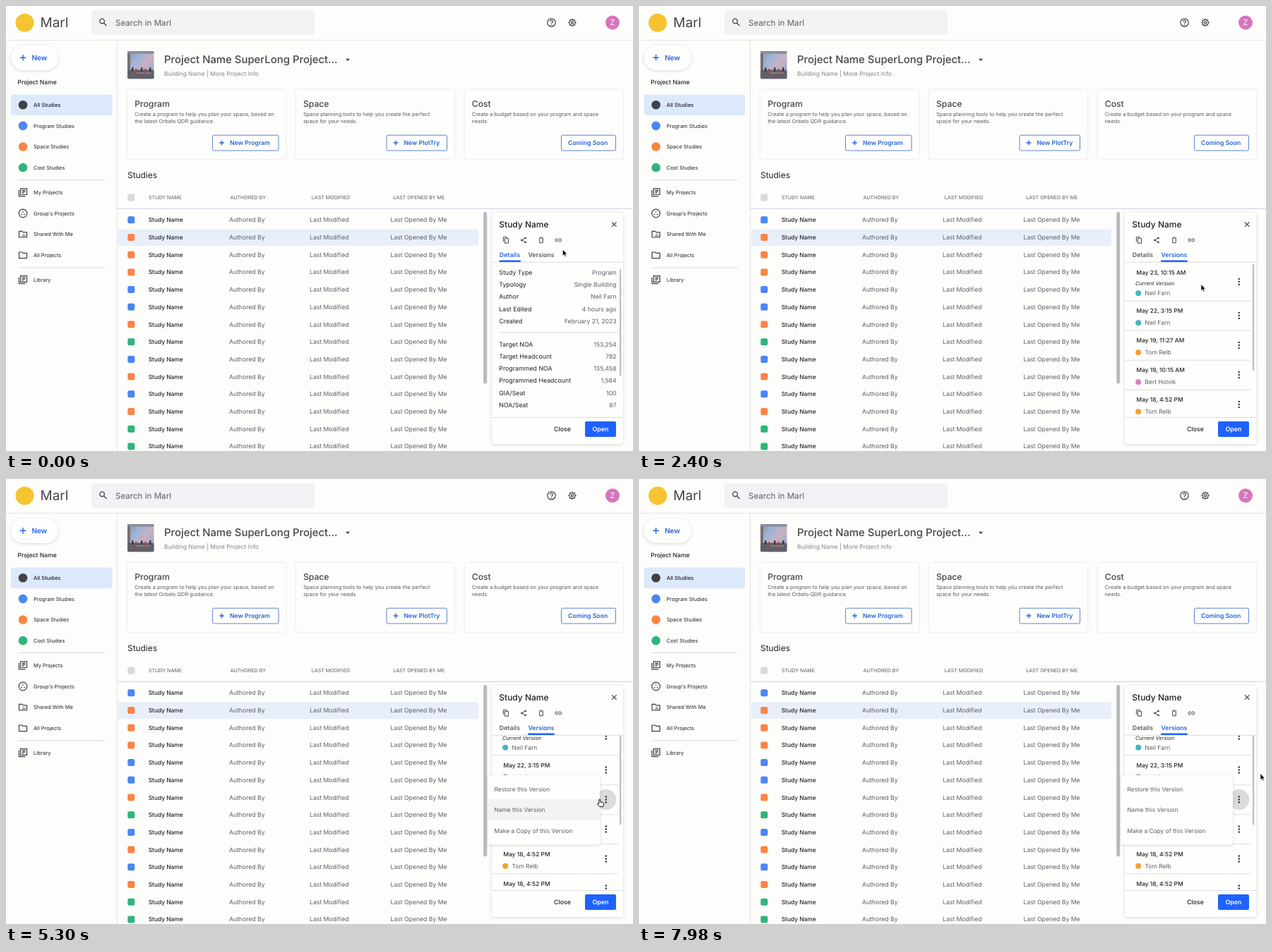
These frames come from a looping animation (888 px wide and 631 px high, 8000 ms). An HTML page:

```html
<!DOCTYPE html>
<html lang="en">
<head>
<meta charset="utf-8">
<title>Study versions</title>
<style>
  html, body { margin: 0; width: 100%; height: 100%; overflow: hidden; background: #fdfdfb; }
  svg { display: block; width: 100vw; height: 100vh; }
  text { font-family: Inter, Roboto, sans-serif; text-rendering: geometricPrecision; white-space: pre; }
  .line { fill: none; stroke: #3c4043; stroke-width: 1.2; }
  .card { fill: #fdfdfb; filter: drop-shadow(0 .6px 1px rgba(60, 64, 90, .22)); }
  .raised { fill: #fefefc; filter: drop-shadow(0 1px 2px rgba(60, 64, 67, .2)); }
</style>
</head>
<body>
<svg id="stage" viewBox="0 0 888 631" preserveAspectRatio="none"></svg>
<script>
const LOOP = 8000;
const INK = '#202124', DARK = '#444649', GREY = '#5a5d62', ACTION = '#2564dc', BRIGHT = '#1f62ff';
const BLUE = '#4b86f4', ORANGE = '#f98446', GREEN = '#31b47c';

// ---- drawing helpers: each returns SVG markup ----
const text = (x, y, str, size, fill = GREY, weight = 400, extra = '') =>
  `<text x="${x}" y="${y}" font-size="${size}" fill="${fill}" font-weight="${weight}" ${extra}>${str}</text>`;
const rect = (x, y, w, h, fill, r = 0, extra = '') =>
  `<rect x="${x}" y="${y}" width="${w}" height="${h}" rx="${r}" fill="${fill}" ${extra}/>`;
const box = (x, y, w, h, r, cls) =>
  `<rect x="${x}" y="${y}" width="${w}" height="${h}" rx="${r}" class="${cls}"/>`;
const dot = (x, y, r, fill, extra = '') => `<circle cx="${x}" cy="${y}" r="${r}" fill="${fill}" ${extra}/>`;
const hline = (x1, x2, y, color = '#dadce0') => rect(x1, y - .5, x2 - x1, 1, color);
const icon = (x, y, d, extra = '') =>
  `<path transform="translate(${x} ${y})" class="line" d="${d}" ${extra}/>`;
const plus = (x, y, r) => icon(x, y, `M${-r} 0H${r}M0 ${-r}V${r}`, `style="stroke:${ACTION};stroke-width:1.4"`);
const kebab = (x, y) => [-4, 0, 4].map(dy => dot(x, y + dy, 1.3, '#3c4043')).join('');
const group = (id, body) => `<g id="${id}">${body}</g>`;

const FOLDER = 'M-5.5 -4.2H-1.2L.2 -2.8H5.5V4.4H-5.5Z';
const LIBRARY = 'M-3.4 -5.5H5.5V3.2H-3.4ZM-5.6 -3.5V5.5H3.5M-1.2 -3H3.4M-1.2 -1.1H3.4M-1.2 .8H1.6';
const ring = r => `M${r} 0A${r} ${r} 0 1 1 ${-r} 0A${r} ${r} 0 1 1 ${r} 0`;

function header() {
  const teeth = Array.from({ length: 8 }, (_, i) => {
    const a = i * Math.PI / 4, c = Math.cos(a), s = Math.sin(a);
    return `M${4 * c} ${4 * s}L${5.8 * c} ${5.8 * s}`;
  }).join('');
  return dot(26.5, 23.8, 13, '#f6c430') +
    text(48.5, 30, 'Marl', 19, DARK) +
    rect(121, 6, 316, 35, '#f1f2f4', 4) +
    icon(136.5, 22, 'M3 -.5A3.4 3.4 0 1 1 -3.8 -.5A3.4 3.4 0 1 1 3 -.5M2 2L6 6') +
    text(155, 27.7, 'Search in Marl', 11.6) +
    icon(772.5, 23.5, ring(5.7) + 'M-1.9 -1.3A1.9 1.9 0 1 1 .9 .3Q0 .8 0 1.6M0 2.6V3.7') +
    icon(802, 23.5, ring(4.2) + ring(1.6) + teeth) +
    dot(859, 23.5, 10, '#d675bd') +
    text(859, 27.4, 'Z', 11, '#fff', 400, 'text-anchor="middle"') +
    hline(0, 888, 48.5, '#e2e3e6');
}

function sidebar() {
  const studies = [['All', '#414247'], ['Program', BLUE], ['Space', ORANGE], ['Cost', GREEN]];
  const places = [
    ['My Projects', 264.3, LIBRARY],
    ["Group's Projects", 294, ring(5.8) + 'M0 -3V-1.2M-2.9 1.7H-1.1M1.1 1.7H2.9'],
    ['Shared With Me', 323.6, FOLDER + 'M1.2 -.6V.8M-1 3V2.4H3.4V3'],
    ['All Projects', 353.2, FOLDER],
    ['Library', 388.2, LIBRARY]];
  return rect(157, 48, 1, 583, '#e0e1e4') +
    box(7, 56, 67, 35, 17.5, 'raised') + plus(24, 73.3, 4.2) +
    text(36.5, 76.8, 'New', 10, ACTION, 600) +
    text(16.5, 111, 'Project Name', 8.6, INK, 500) +
    rect(7, 125.5, 143.5, 29.5, '#dce9fb', 3) +
    studies.map(([name, color], i) => {
      const y = 140.2 + 29.65 * i;
      return dot(24, y, 6.3, color) +
        text(39, y + 2.7, name + ' Studies', i ? 7.4 : 7.6, INK, i ? 400 : 500);
    }).join('') +
    hline(17, 140, 246.5) + hline(17, 140, 371) +
    places.map(([name, y, d]) => icon(24, y, d) + text(39, y + 2.7, name, 7.4, INK)).join('');
}

function thumbnail() {
  const people = [178, 183, 191, 196, 203].map((x, i) =>
    rect(x, 87 + i % 2 * 2, 2.4, 6, i % 2 ? '#a3483f' : '#3a3640', 1)).join('');
  return `<defs><linearGradient id="glow" x2="1" y2=".8">
      <stop offset="0" stop-color="#8a92a3"/><stop offset=".35" stop-color="#9db4d8"/>
      <stop offset=".65" stop-color="#cbb0bf"/><stop offset="1" stop-color="#8ea8d0"/></linearGradient></defs>` +
    rect(172, 64, 37.5, 39.3, 'url(#glow)', 2) +
    rect(172, 64, 4, 27, '#77706f') + rect(172, 64, 37.5, 3.5, '#868c98', 1) +
    rect(172, 90.5, 37.5, 12.8, '#625f69', 2) + rect(185, 94, 20, 2, '#857e8a') + people;
}

function button(x, w, label) {
  const hasPlus = label.startsWith('New');
  return rect(x + .5, 183.2, w - 1, 21.8, '#fefefc', 2, 'stroke="#5d83d4"') +
    (hasPlus ? plus(x + 13.5, 194, 3.4) : '') +
    text(x + (hasPlus ? 25 : 10), 197.2, label, 8.7, ACTION, 600);
}

function projectArea() {
  const cards = [
    [172, 'Program', 'Create a program to help you plan your space, based on', 'the latest Orbelo QDR guidance.', 292, 94.5, 'New Program'],
    [410.7, 'Space', 'Space planning tools to help you create the perfect', 'space for your needs.', 538.5, 86.5, 'New PlotTry'],
    [649.5, 'Cost', 'Create a budget based on your program and space', 'needs.', 786, 78, 'Coming Soon']];
  return thumbnail() +
    text(224, 81, 'Project Name SuperLong Project...', 14.9, DARK, 500) +
    `<path d="M480.8 74.7H487.2L484 78Z" fill="${DARK}"/>` +
    text(224, 99, 'Building Name | More Project Info', 8.45, '#80868b') +
    cards.map(([x, title, line1, line2, bx, bw, label]) =>
      box(x, 118.5, 224.5, 98.5, 4, 'card') +
      text(x + 10.2, 142.5, title, 12.2, DARK, 500) +
      text(x + 10.2, 156, line1, 7.45) + text(x + 10.2, 165.6, line2, 7.45) +
      button(bx, bw, label)).join('');
}

function studyTable() {
  const headings = ['STUDY NAME', 'AUTHORED BY', 'LAST MODIFIED', 'LAST OPENED BY ME'];
  const colors = { b: BLUE, o: ORANGE, g: GREEN };
  return text(172, 244.2, 'Studies', 11.9, INK) +
    rect(172.3, 266.5, 10, 10, '#d8d9db', 2) +
    headings.map((h, i) => text(202 + 115.4 * i, 274.3, h, 7.1)).join('') +
    hline(158, 888, 287.3, '#cfd0e6') +
    rect(159, 316.5, 510, 23.5, '#e8effb') +
    [...'booobbogbobogg'].map((key, i) => {
      const y = 303.3 + 24.7 * i;
      return rect(172.3, y - 5, 10, 10, colors[key], 2.5) +
        text(201.7, y + 3, 'Study Name', 8.4, INK, 500) +
        text(316, y + 3, 'Authored By', 8.65) +
        text(430, y + 3, 'Last Modified', 8.65) +
        text(544.5, y + 3, 'Last Opened By Me', 8.65);
    }).join('') +
    rect(676.2, 292, 5, 243.5, '#b7babf', 2.5);
}

function details() {
  const rows = [['Study Type', 'Program'], ['Typology', 'Single Building'], ['Author', 'Neil Farn'],
    ['Last Edited', '4 hours ago'], ['Created', 'February 21, 2023'],
    ['Target NOA', '153,254'], ['Target Headcount', '782'], ['Programmed NOA', '135,458'],
    ['Programmed Headcount', '1,584'], ['GIA/Seat', '100'], ['NOA/Seat', '87']];
  return rows.map(([label, value], i) => {
    const y = 380.8 + 17.3 * i + (i > 4 ? 15.2 : 0);
    return text(698.3, y, label, 8.8, INK) + text(864.5, y, value, 8.6, GREY, 400, 'text-anchor="end"');
  }).join('') + hline(698, 867, 463) + rect(869, 373.5, 2.2, 151, '#bcbfc3', 1);
}

function versions() {
  const teal = '#43b5c0', amber = '#f5a030', pink = '#d582c6';
  const list = [['May 23, 10:15 AM', 'Neil Farn', teal], ['May 22, 3:15 PM', 'Neil Farn', teal],
    ['May 19, 11:27 AM', 'Tom Relb', amber], ['May 19, 10:15 AM', 'Bert Holvik', pink],
    ['May 18, 4:52 PM', 'Tom Relb', amber], ['May 18, 4:52 PM', 'Tom Relb', amber]];
  return dot(849.8, 481, 14.6, '#dadbdc', 'id="ripple"') +
    list.map(([date, author, color], i) => {
      const y = i ? 390 + 42 * i : 377.5, nameY = 407 + 42 * i;
      return text(704.5, y + 3, date, 8.4, INK, 500) +
        dot(707.2, nameY + .2, 4, color) + text(716.5, nameY + 3.2, author, 8.5) +
        kebab(849.8, i ? 397 + 42 * i : 391) + hline(688, 867, 418.2 + 42 * i, '#dcddda');
    }).join('') +
    text(703, 396, 'Current Version', 7.45, INK, 400, 'font-style="italic"') +
    rect(869, 366, 2.2, 151, '#bcbfc3', 1);
}

function panel() {
  const thin = 'style="stroke-width:1"';
  return box(688, 292.5, 186, 328.5, 4, 'raised') +
    text(698.3, 314, 'Study Name', 12, INK, 500) +
    icon(861.3, 309.6, 'M-3.3 -3.3L3.3 3.3M3.3 -3.3L-3.3 3.3') +
    icon(708, 332, 'M-1.6 -2.4H3.6V4.2H-1.6ZM-3.6 2V-4.3H2', thin) +
    icon(733, 332, 'M2.6 -3L-2.6 0L2.6 3', thin) +
    dot(735.6, 329, 1.3, '#3c4043') + dot(730.4, 332, 1.3, '#3c4043') + dot(735.6, 335, 1.3, '#3c4043') +
    icon(758, 332, 'M-2.3 -2.2V3.8H2.3V-2.2M-3.2 -3H3.2M-1 -4H1', thin) +
    icon(782.3, 332, 'M-.8 -2H-2.2A2 2 0 0 0 -2.2 2H-.8M.8 -2H2.2A2 2 0 0 1 2.2 2H.8M-1.7 0H1.7', thin) +
    text(698.8, 356, 'Details', 8.8, GREY, 600, 'id="detailsTab"') +
    text(739.5, 356, 'Versions', 8.7, GREY, 600, 'id="versionsTab"') +
    hline(688, 874, 363.3) +
    rect(698.5, 360.6, 30.5, 2.4, BRIGHT, 1, 'id="underline"') +
    '<clipPath id="body"><rect x="688" y="364" width="186" height="219.5"/></clipPath>' +
    `<g clip-path="url(#body)">${group('details', details())}${group('versions', versions())}</g>` +
    hline(688, 874, 583.5) +
    text(776, 603.3, 'Close', 8.8, INK, 500) +
    rect(820, 589, 44, 22, BRIGHT, 2) +
    text(842, 603.3, 'Open', 8.8, '#fff', 600, 'text-anchor="middle"');
}

function menu() {
  const items = ['Restore this Version', 'Name this Version', 'Make a Copy of this Version'];
  return box(682, 420, 159, 98.5, 3, 'raised') +
    rect(682, 454, 159, 30, '#f3f3f2', 0, 'id="hover"') +
    items.map((label, i) => text(691.5, 442.6 + 29.7 * i, label, 8.4)).join('');
}

const pointers =
  group('arrow', '<path d="M0 0V9.4L2.1 7.5L3.6 10.8L5.2 10.1L3.8 6.9H6.6Z" fill="#000" stroke="#fff" stroke-width=".8"/>') +
  group('hand', `<path d="M-1 .7Q0 -.5 1 .7V4L4.6 4.8Q6 5.2 5.7 6.8L5 10.6H-.2L-3.4 6.8Q-3.2 5.4 -1 6.5Z"
    fill="#fff" stroke="#111" stroke-width="1" stroke-linejoin="round"/>`);

document.getElementById('stage').innerHTML =
  header() + sidebar() + projectArea() + studyTable() + panel() + group('menu', menu()) + pointers;

// ---- motion ----
const el = id => document.getElementById(id);
const show = (id, on) => el(id).style.display = on ? '' : 'none';
const within = (t, from, to) => t >= from && t < to;
const smooth = (t, from, to) => {
  const u = Math.min(1, Math.max(0, (t - from) / (to - from)));
  return u * u * (3 - 2 * u);
};

const path = [ // time, x, y of the pointer tip
  [0, 788.3, 345], [700, 762, 352], [1000, 760, 354], [1420, 770.5, 364.3], [2000, 775, 368],
  [2900, 825, 431], [3220, 825, 431.5], [4180, 829.5, 441], [4650, 848, 454], [4950, 849, 454.5],
  [5300, 840.8, 454], [5800, 800, 468], [6200, 802, 472], [6460, 809.8, 488.5],
  [6900, 806, 493], [7600, 878, 420], [LOOP, 880, 417.5]];

function pointerAt(t) {
  const i = Math.max(1, path.findIndex(p => p[0] > t));
  const [t0, x0, y0] = path[i - 1], [t1, x1, y1] = path[i];
  const u = smooth(t, t0, t1);
  return `translate(${x0 + (x1 - x0) * u} ${y0 + (y1 - y0) * u})`;
}

function render(t) {
  const onVersions = t >= 900;
  show('details', !onVersions);
  show('versions', onVersions);
  el('detailsTab').setAttribute('fill', onVersions ? GREY : ACTION);
  el('versionsTab').setAttribute('fill', onVersions ? ACTION : GREY);
  el('underline').setAttribute('x', onVersions ? 739 : 698.5);
  el('underline').setAttribute('width', onVersions ? 38 : 30.5);
  el('versions').setAttribute('transform', `translate(0 ${-26.4 * smooth(t, 3100, 3445)})`);

  show('ripple', t >= 4600);
  show('menu', t >= 4800);
  show('hover', within(t, 5200, 7150));
  el('hover').setAttribute('y', t < 6520 ? 454 : 484);

  const pointing = within(t, 550, 1150) || within(t, 4550, 7200);
  show('hand', pointing);
  show('arrow', !pointing);
  el(pointing ? 'hand' : 'arrow').setAttribute('transform', pointerAt(t));
}

function tick() {
  render(performance.now() % LOOP);
  requestAnimationFrame(tick);
}
tick();
</script>
</body>
</html>
```
